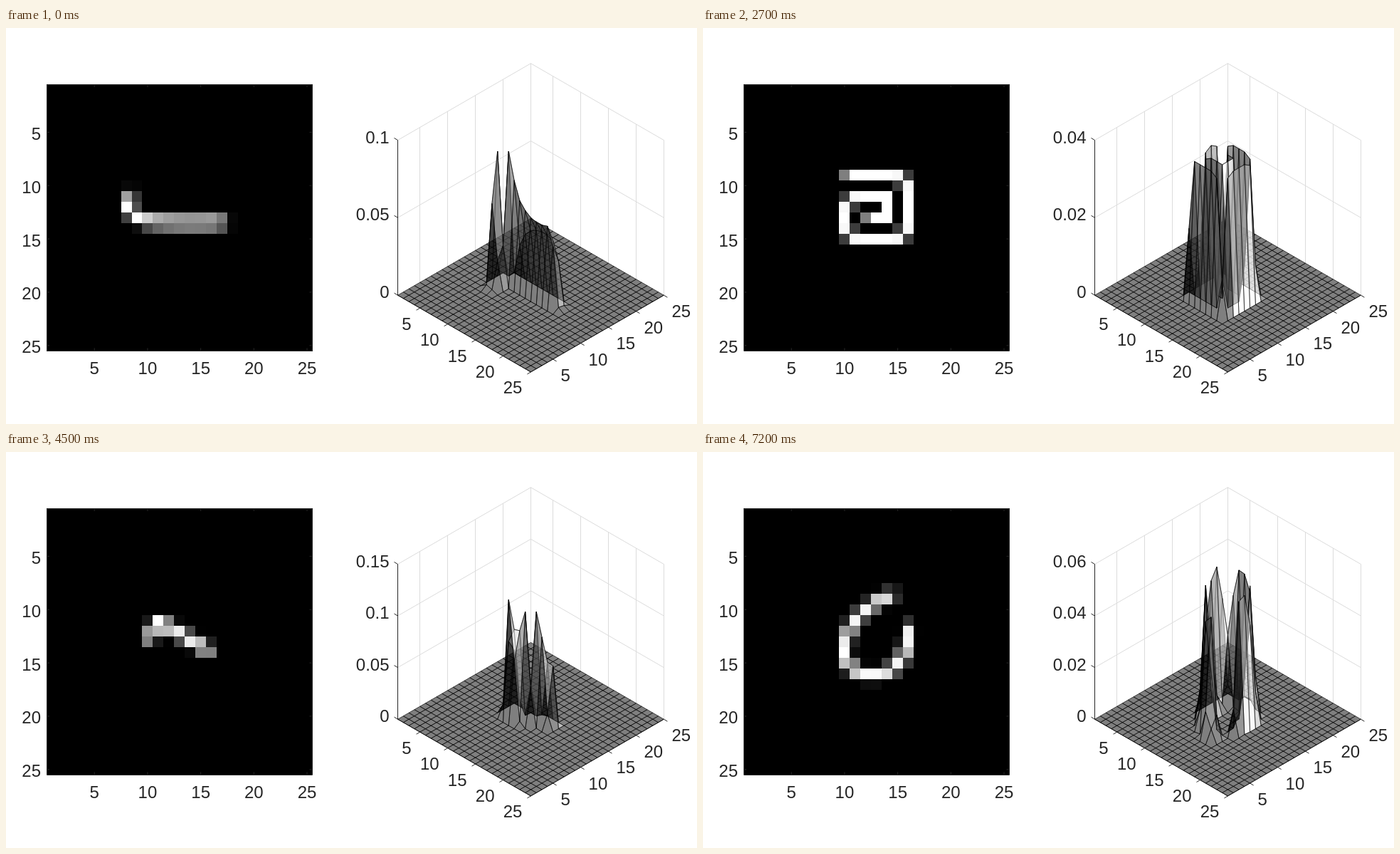
Write an HTML page with a canvas that moves like this. It is 971x556 px and loops after 8000 ms.

```html
<!DOCTYPE html>
<html lang="en">
<head>
<meta charset="utf-8">
<title>Blur kernels</title>
<style>
  html, body { margin: 0; width: 100%; height: 100%; overflow: hidden; background: #fff; }
  canvas { display: block; }
</style>
</head>
<body>
<canvas id="stage" width="971" height="556"></canvas>
<script>
const ctx = document.getElementById('stage').getContext('2d');
const SIZE = 25, HOLD = 900, LOOP = 8000, INK = '#262626', GRID = '#dcdcdc';
const TICKS = [5, 10, 15, 20, 25];

// Each kernel is the path of a shaken camera over the pixel grid.
const kernels = [
  expose('M8.4 10.7 L8 12 9 13 10 13.3 Q13 13.55 17.3 13.4'),
  expose('M9 9 L12 12 Q16 13 15.5 16 L12 17.5'),
  expose('M10.5 15.2 Q8 13.3 9 12 Q10 10.2 12.5 10.1 L14.5 10.2 16 9.8 17 9.9 18.3 11.1', .6, 1.2),
  expose('M10 9 H15 L16 10 V14 L15 15 H11 L10 14 V12 L11 11 H14 V13 H12'),
  expose('M9 14.8 L10 16 Q12.2 16.8 14 15 L16 13 Q16.5 9 14 9 Q12 9 12 12 L12.1 14.2'),
  expose('M10 13 L11 11 16 14'),
  expose('M12 15.2 L15.1 12.9 17.3 10.9 18.2 9.9 17.3 10 13.4 11.6 11.4 13.1 8.5 15 6.8 15.9'),
  expose('M6.3 14.6 L7 13 8 12 9.5 11.2 Q11.5 9.9 14 11 L16 13 Q18.3 14.4 18.4 16.2'),
  expose('M14.7 8.6 Q13 8.9 11 11 Q10 12.4 10 14 Q10.2 16 12.5 16.1 Q16.2 16 16 11.4')
];

// Spread the path over the grid with bilinear weights; the exposure may ramp along it.
function expose(d, from = 1, to = from) {
  const path = document.createElementNS('http://www.w3.org/2000/svg', 'path');
  path.setAttribute('d', d);
  const grid = Array.from({ length: SIZE + 1 }, () => Array(SIZE + 1).fill(0));
  const length = path.getTotalLength(), samples = 600;
  for (let s = .5; s < samples; s++) {
    const t = s / samples, { x, y } = path.getPointAtLength(t * length);
    const mass = (from + (to - from) * t) * length / samples;
    const c = Math.floor(x), r = Math.floor(y), u = x - c, v = y - r;
    grid[r][c] += mass * (1 - u) * (1 - v);
    grid[r][c + 1] += mass * u * (1 - v);
    grid[r + 1][c] += mass * (1 - u) * v;
    grid[r + 1][c + 1] += mass * u * v;
  }
  const all = grid.flat(), max = Math.max(...all), sum = all.reduce((a, b) => a + b);
  const peak = max / sum, step = peak > .08 ? .05 : .02, count = Math.ceil(peak / step);
  return { grid, max, sum, step, count };
}

const gray = v => { const g = Math.round(255 * v); return `rgb(${g},${g},${g})`; };

function line(color, ...points) {
  ctx.strokeStyle = color;
  ctx.beginPath();
  points.forEach(p => ctx.lineTo(...p));
  ctx.stroke();
}

function label(text, x, y, align) {
  ctx.fillStyle = INK;
  ctx.textAlign = align;
  ctx.fillText(text, x, y);
}

function drawImage({ grid, max }) {
  const left = 57, top = 79, width = 373.5, height = 374.3;
  const col = i => Math.round(left + (i - 1) * width / SIZE);
  const row = i => Math.round(top + (i - 1) * height / SIZE);
  for (let r = 1; r <= SIZE; r++) for (let c = 1; c <= SIZE; c++) {
    ctx.fillStyle = gray(grid[r][c] / max);
    ctx.fillRect(col(c), row(r), col(c + 1) - col(c), row(r + 1) - row(r));
  }
  ctx.strokeStyle = INK;
  ctx.strokeRect(left + .5, top + .5, 373, 374);
  for (const n of TICKS) {
    const x = left + (n - .5) * width / SIZE, y = top + (n - .5) * height / SIZE;
    line(INK, [x, top], [x, top + 4]);
    line(INK, [x, top + height], [x, top + height - 4]);
    line(INK, [left, y], [left + 4, y]);
    line(INK, [left + width, y], [left + width - 4, y]);
    label(n, x, 486, 'center');
    label(n, 49, y + 10.5, 'right');
  }
}

// Isometric position of column c and row r; h runs from 0 to 1 over the box height.
const project = (c, r, h = 0) => [550.5 + (c + r - 2) * 7.79, 375.2 + (c - r) * 4.49 - h * 217.7];

function wallLine(c, r) {
  const [x, y] = project(c, r), snapped = Math.floor(x) + .5;
  line(GRID, [snapped, y], [snapped, project(c, r, 1)[1]]);
}

function drawAxes({ step, count }) {
  for (const n of TICKS) {
    wallLine(1, n);
    wallLine(n, SIZE);
  }
  for (let i = 0; i <= count; i++) {
    const h = i / count, [x, y] = project(1, 1, h);
    line(GRID, [x, y], project(1, SIZE, h), project(SIZE, SIZE, h));
    line(INK, [x, y], [x - 5, y - 3]);
    label(+(i * step).toFixed(2), 538.5, y + 4, 'right');
  }
  line(INK, project(1, 1, 1), project(1, 1), project(SIZE, 1), project(SIZE, SIZE));
  for (const n of TICKS) {
    const [x, y] = project(n, 1), [u, v] = project(SIZE, n);
    line(INK, [x, y], [x - 5, y + 3]);
    line(INK, [u, v], [u + 5, v + 3]);
    label(n, x - 12, y + 30.5, 'right');
    label(n, u + 11, v + 31, 'left');
  }
}

// Half-transparent faces from back to front, each coloured by its first corner.
function drawSurface({ grid, max, sum, step, count }) {
  const corner = (c, r) => project(c, r, grid[r][c] / sum / (step * count));
  ctx.lineWidth = .6;
  ctx.lineJoin = 'round';
  for (let r = SIZE - 1; r >= 1; r--) for (let c = 1; c < SIZE; c++) {
    const a = corner(c, r);
    ctx.fillStyle = gray(grid[r][c] / max);
    ctx.strokeStyle = '#000';
    ctx.beginPath();
    for (const p of [a, corner(c + 1, r), corner(c + 1, r + 1), corner(c, r + 1)]) ctx.lineTo(...p);
    ctx.closePath();
    ctx.globalAlpha = .5;
    ctx.fill();
    ctx.globalAlpha = 1;
    ctx.stroke();
  }
}

function draw(kernel) {
  ctx.fillStyle = '#fff';
  ctx.fillRect(0, 0, 971, 556);
  ctx.font = '24px "Liberation Sans", Arial, sans-serif';
  ctx.lineWidth = 1;
  drawImage(kernel);
  drawAxes(kernel);
  drawSurface(kernel);
}

let shown = -1;
const start = performance.now();
function tick() {
  const index = Math.floor((performance.now() - start) % LOOP / HOLD);
  if (index !== shown) draw(kernels[shown = index]);
  requestAnimationFrame(tick);
}
tick();
</script>
</body>
</html>
```
